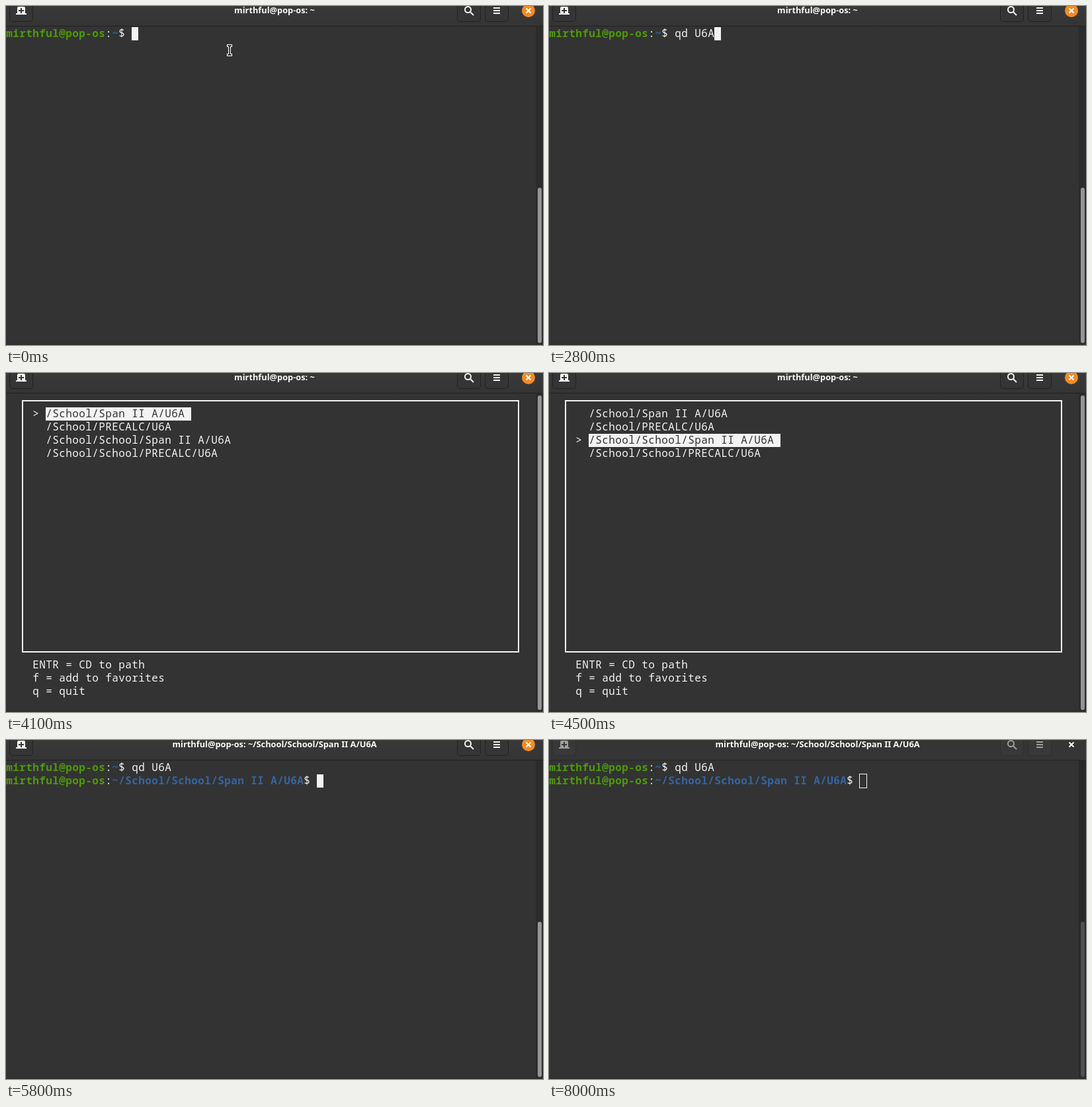
These frames come from a looping animation (812 by 513 pixels, 8.1 s). An HTML page with a canvas:

```html
<!DOCTYPE html>
<html lang="en">
<head>
<meta charset="utf-8">
<title>Terminal</title>
<style>
html, body { margin: 0; width: 812px; height: 513px; overflow: hidden; background: #333; }
canvas { display: block; }
</style>
</head>
<body>
<canvas id="stage" width="812" height="513"></canvas>
<script>
const ctx = document.getElementById('stage').getContext('2d');
const LOOP = 8100, CELL = 10, ROW = 20, TOP = 32;
const BG = '#333333', FG = '#f3f3f3', GREEN = '#4e9a06', BLUE = '#3465a4';
const USER = 'mirthful@pop-os', FOLDER = '~/School/School/Span II A/U6A';
const PATHS = ['/School/Span II A/U6A', '/School/PRECALC/U6A',
  '/School/School/Span II A/U6A', '/School/School/PRECALC/U6A'];
const HELP = ['ENTR = CD to path', 'f = add to favorites', 'q = quit'];

// Each step overrides only what changes at that time.
const STEPS = [
  [0, { view: 'shell', cmd: '', cursor: true, pointer: 'beam', fade: 0 }],
  [100, { cursor: false }],
  [300, { cmd: 'q', cursor: true }],
  [400, { pointer: '' }],
  [800, { cmd: 'qd' }],
  [900, { cmd: 'qd ' }],
  [1400, { cmd: 'qd U' }],
  [1900, { cursor: false }],
  [2400, { cmd: 'qd U6', cursor: true }],
  [2800, { cmd: 'qd U6A' }],
  [3000, { view: 'running' }],
  [3200, { view: 'picker', pick: 0 }],
  [3600, { cursor: false }],
  [4100, { cursor: true }],
  [4200, { pick: 1 }],
  [4500, { pick: 2 }],
  [5000, { pick: 3 }],
  [5400, { pick: 2 }],
  [5800, { view: 'done' }],
  [6400, { cursor: false }],
  [6900, { cursor: true, pointer: 'arrow' }],
  [7000, { pointer: '' }],
  [7600, { cursor: false }],
  [7800, { fade: 0.4 }],
  [7900, { fade: 0.8 }],
  [8000, { fade: 1 }]
];

function stateAt(time) {
  return Object.assign({}, ...STEPS.filter(step => step[0] <= time).map(step => step[1]));
}

function grey(from, to, amount) {
  const v = Math.round(from + (to - from) * amount);
  return `rgb(${v},${v},${v})`;
}

function box(x, y, w, h, color) {
  ctx.fillStyle = color;
  ctx.fillRect(x, y, w, h);
}

function rounded(x, y, w, h, r, color) {
  ctx.fillStyle = color;
  ctx.beginPath();
  ctx.roundRect(x, y, w, h, r);
  ctx.fill();
}

function line(points, color, width) {
  ctx.strokeStyle = color;
  ctx.lineWidth = width;
  ctx.beginPath();
  points.forEach(([x, y], i) => i ? ctx.lineTo(x, y) : ctx.moveTo(x, y));
  ctx.stroke();
}

// Places text on the character grid and returns the next column.
function put(text, col, row, color = FG, weight = 400) {
  ctx.font = `${weight} 16px "Noto Sans Mono", "DejaVu Sans Mono", monospace`;
  ctx.textAlign = 'center';
  ctx.fillStyle = color;
  [...text].forEach((ch, i) => ctx.fillText(ch, (col + i + 0.5) * CELL, TOP + row * ROW + 15));
  return col + text.length;
}

function prompt(row, folder, command) {
  let col = put(USER, 0, row, GREEN, 700);
  col = put(':', col, row);
  col = put(folder, col, row, BLUE, 700);
  return put('$ ' + command, col, row);
}

function drawCursor(col, row, state) {
  const x = col * CELL, y = TOP + row * ROW;
  if (state.fade) {
    ctx.strokeStyle = FG;
    ctx.lineWidth = 1;
    ctx.strokeRect(x - 0.5, y - 0.5, 11, 21);
  } else if (state.cursor) {
    box(x, y, CELL, ROW, FG);
  }
}

function drawButton(x, fade) {
  rounded(x - 1, -8, 36, 32, 5, grey(34, 46, fade));
  rounded(x, -8, 34, 31, 4, grey(53, 56, fade));
}

function drawHeader(title, fade) {
  const fill = ctx.createLinearGradient(0, 0, 0, 30);
  fill.addColorStop(0, grey(57, 53, fade));
  fill.addColorStop(1, grey(52, 53, fade));
  box(0, 0, 812, 30, fill);
  box(0, 30, 812, 1, grey(34, 38, fade));
  [6, 683, 725].forEach(x => drawButton(x, fade));

  const icon = grey(245, 158, fade), hole = grey(53, 56, fade);
  rounded(17, 1, 12, 11, [2, 2, 0, 0], icon);
  box(15, 11, 16, 2, icon);
  box(19, 6, 8, 2, hole);
  box(22, 3, 2, 8, hole);

  ctx.strokeStyle = icon;
  ctx.lineWidth = 2;
  ctx.beginPath();
  ctx.arc(698.5, 5.5, 4.5, 0, Math.PI * 2);
  ctx.stroke();
  line([[702, 9], [707, 14]], icon, 2);
  [2, 6, 10].forEach(y => box(737, y, 10, 2, icon));

  ctx.globalAlpha = 1 - fade;
  rounded(780, -3, 20, 20, 10, '#f28b26');
  ctx.globalAlpha = 1;
  line([[786.5, 3.5], [793.5, 10.5]], '#fff', 2);
  line([[793.5, 3.5], [786.5, 10.5]], '#fff', 2);

  ctx.font = '700 12.8px "Noto Sans", "Open Sans", sans-serif';
  ctx.textAlign = 'center';
  ctx.fillStyle = '#fafafa';
  ctx.fillText(title, 406, 11);
}

function drawScrollbar(top, fade) {
  box(801, 31, 11, 482, grey(44, 41, fade));
  rounded(804, top, 6, 510 - top, 3, grey(149, 80, fade));
}

function drawPicker(state) {
  ctx.strokeStyle = FG;
  ctx.lineWidth = 2;
  ctx.strokeRect(25, 42, 750, 380);
  PATHS.forEach((path, i) => {
    const chosen = i === state.pick;
    if (chosen) {
      put('>', 4, i + 1);
      box(60, TOP + (i + 1) * ROW, path.length * CELL, ROW, FG);
      drawCursor(6 + path.length, i + 1, state);
    }
    put(path, 6, i + 1, chosen ? BG : FG);
  });
  HELP.forEach((text, i) => put(text, 4, 20 + i));
}

function drawShell(state) {
  let col = prompt(0, '~', state.cmd), row = 0;
  if (state.view === 'running') {
    col = 0;
    row = 1;
  } else if (state.view === 'done') {
    col = prompt(1, FOLDER, '');
    row = 1;
  }
  drawCursor(col, row, state);
}

function drawPointer(kind) {
  if (kind === 'beam') {
    [['#fff', 4, 1], ['#000', 1.5, 0]].forEach(([color, width, grow]) => {
      line([[338, 60], [338, 74]], color, width);
      line([[335 - grow, 60], [341 + grow, 60]], color, width);
      line([[335 - grow, 74], [341 + grow, 74]], color, width);
    });
  } else if (kind === 'arrow') {
    ctx.beginPath();
    [[316, 19], [316, 33], [319, 30], [322, 36], [324, 35], [321, 29], [326, 29]]
      .forEach(([x, y]) => ctx.lineTo(x, y));
    ctx.closePath();
    ctx.fillStyle = '#000';
    ctx.fill();
    ctx.strokeStyle = '#fff';
    ctx.lineWidth = 1;
    ctx.stroke();
  }
}

function draw(time) {
  const state = stateAt(time), picking = state.view === 'picker';
  box(0, 0, 812, 513, BG);
  drawHeader(`${USER}: ${state.view === 'done' ? FOLDER : '~'}`, state.fade);
  drawScrollbar(picking ? 34 : 275, state.fade);
  box(0, 511, 812, 2, '#2e2e2e');
  if (picking) drawPicker(state);
  else drawShell(state);
  drawPointer(state.pointer);
}

const start = performance.now();
function tick() {
  draw((performance.now() - start) % LOOP);
  requestAnimationFrame(tick);
}
tick();
</script>
</body>
</html>
```
